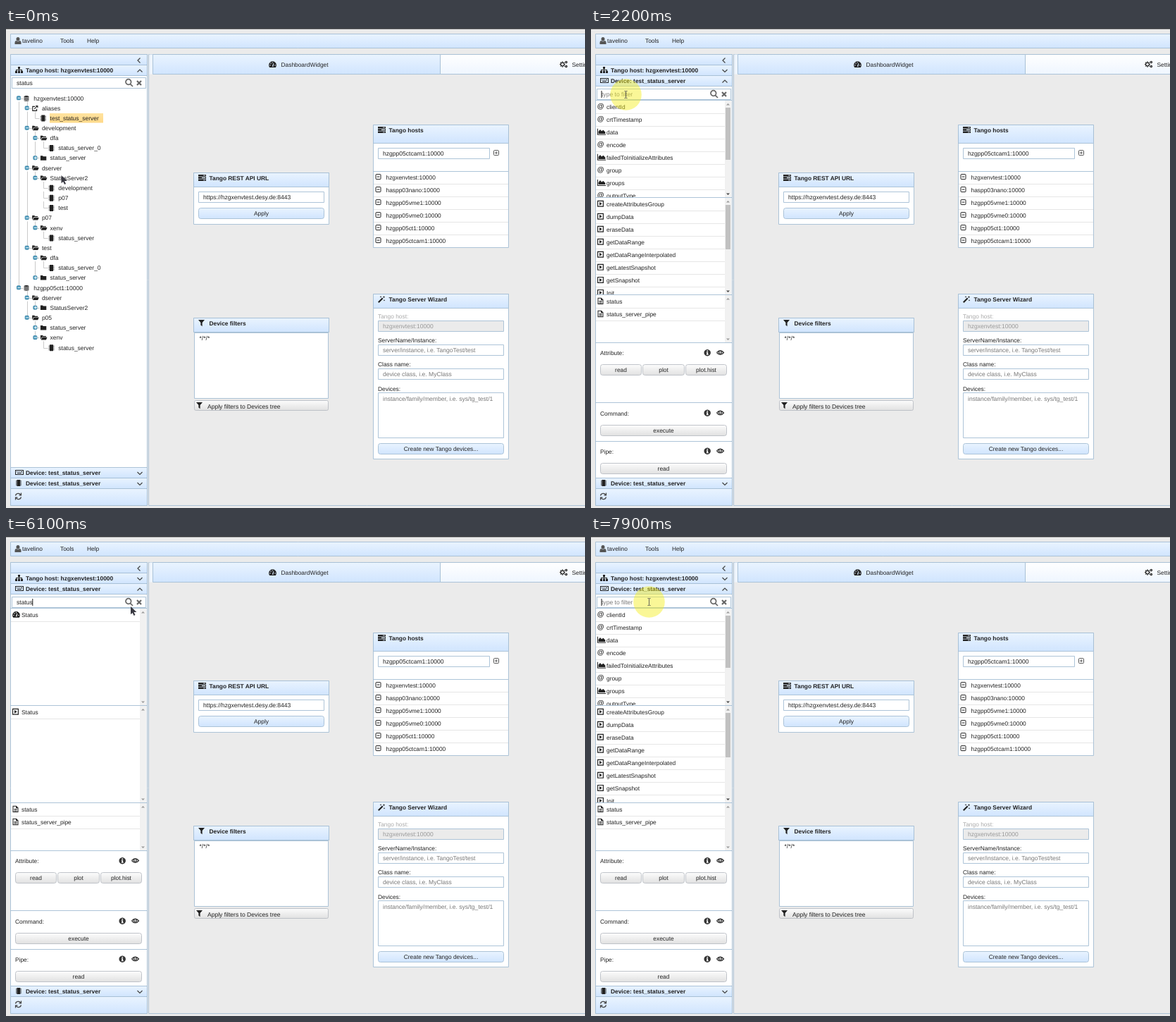
Write an HTML page with a canvas that moves like this. It is 822 by 681 pixels and loops after 8000 ms.

```html
<!DOCTYPE html>
<html lang="en">
<head>
<meta charset="utf-8">
<style>
html, body { margin: 0; width: 100%; height: 100%; overflow: hidden; background: #ebebeb; }
canvas { display: block; }
</style>
</head>
<body>
<canvas id="stage" width="822" height="681"></canvas>
<script>
const ctx = document.getElementById('stage').getContext('2d');
ctx.textRendering = 'geometricPrecision';
const LOOP = 8000, STEP = 100;
const EDGE = '#a4bed4', INK = '#222', HINT = '#777', BLUE = ['#eaf4ff', '#d1e5fe'], GREY = ['#fdfdfd', '#e2e2e2'];
const SMALL = 8.38, FIELD = 8.55;

// Paths starting with "~" are stroked, the others filled.
const shapes = {
  user: 'M4.5 0a2.4 2.6 0 0 1 0 5.4a2.4 2.6 0 0 1 0-5.4M0 10V7.5Q0 5.3 2 5Q4.5 7 7 5Q9 5.3 9 7.5V10z',
  sitemap: 'M4 0h3v3H6v1h4v2h1v3H8V6h1V5H6v1h1v3H4V6h1V5H2v1h1v3H0V6h1V4h4V3H4z',
  keyboard: 'M0 0h12v7H0zM1 1v5h10V1zM2 2h1v1H2zM4 2h1v1H4zM6 2h1v1H6zM8 2h2v1H8zM3 4h6v1H3z',
  chip: 'M1.4 0h5v9h-5zM0 1.3h1v1H0zM0 3.1h1v1H0zM0 4.9h1v1H0zM0 6.7h1v1H0zM6.8 1.3h1v1h-1zM6.8 3.1h1v1h-1zM6.8 4.9h1v1h-1zM6.8 6.7h1v1h-1z',
  search: '~M8.6 4.5a3.8 3.8 0 1 0-7.6 0a3.8 3.8 0 1 0 7.6 0M7.4 7.4l3.6 3.6',
  times: '~M1 1l6 6M7 1L1 7',
  db: 'M0 1.2Q3.5-.8 7 1.2V2Q3.5 3.4 0 2zM0 2.8Q3.5 4.2 7 2.8V4Q3.5 5.4 0 4zM0 4.8Q3.5 6.2 7 4.8V6Q3.5 7.4 0 6zM0 6.8Q3.5 8.2 7 6.8V7.6Q3.5 9 0 7.6z',
  link: '~M4 1.5H.6V7.5H6.4V5M3 5L7.5.6M5 .6h2.7v2.7',
  open: 'M0 6V.5h3l1 1h4v1.2H2.2L.5 6zM2.6 3.3H9.6L8 7H.8z',
  folder: 'M0 .5h3l1 1h4.4v5.5H0z',
  gauge: 'M1.2 9A5.4 5.4 0 1 1 9.8 9zM4.8 7.4L6.6 3l.7.3-1 4.6zM1.2 5.2h1.3v1.2H1.2zM2.4 2.6h1.2v1.2H2.4zM4.9 1.4h1.2v1.2H4.9zM8.4 5.2h1.3v1.2H8.4z',
  server: 'M0 0h11v2.5H0zM7 .8v.8h3V.8zM0 3.3h11v2.5H0zM5 4.1v.8h5v-.8zM0 6.6h11v2.5H0zM7 7.4v.8h3v-.8z',
  filter: 'M0 0h9L5.6 4v5.2L3.4 7.5V4z',
  wand: 'M0 8.5L6 2.5 7.5 4 1.5 10zM8.5 0l.5 1.3 1.3.5L9 2.3l-.5 1.3L8 2.3l-1.3-.5L8 1.3zM4 0l.4 1 1 .4-1 .4-.4 1-.4-1-1-.4 1-.4zM9 5l.4.9.9.4-.9.4L9 7.6l-.4-.9-.9-.4.9-.4z',
  info: 'M4.7 0a4.7 4.7 0 1 1-.01 0zM3.9 1.5h1.7v1.4H3.9zM3.3 3.8h2.3v3h.7v1H3.3v-1h.6V4.8h-.6z',
  eye: '~M.5 4Q5.5-2 10.5 4Q5.5 10 .5 4M7.6 3.6a2.1 2.1 0 1 0-4.2 0a2.1 2.1 0 1 0 4.2 0M5.5 3v1',
  area: 'M0 0h1v8h11v1H0zM1.6 7.2V4L4 1.2l2 2.4L8.5 2 11.3 5v2.2z',
  play: 'M0 0h9v9H0zM1.2 1.2v6.6h6.6V1.2zM3 2l3.6 2.5L3 7z',
  file: 'M0 0h5.2L8 2.8V9.4H0zM1 1v7.4h6V3.5H4.5V1zM2 4.2h4v.8H2zM2 5.7h4v.8H2zM2 7.1h4v.7H2z',
  minus: '~M1.5.6h5q1 0 1 1v5q0 1-1 1h-5q-1 0-1-1v-5q0-1 1-1M2.2 4.1h3.6',
  plus: '~M1.5.6h5q1 0 1 1v5q0 1-1 1h-5q-1 0-1-1v-5q0-1 1-1M2.2 4.1h3.6M4 2.3v3.6',
  refresh: '~M1 4A4 4 0 0 1 8.4 3M9 0v3.3H6M9 6A4 4 0 0 1 1.6 7M1 10V6.7h3',
  left: '~M3.5 0L0 3.5 3.5 7',
  up: '~M0 3.5L3.5 0 7 3.5',
  down: '~M0 0l3.5 3.5L7 0',
  cogs: '~M6.4 5a2.4 2.4 0 1 0-4.8 0a2.4 2.4 0 1 0 4.8 0M4 .8v1.6M4 7.6v1.6M0 5h1.5M6.5 5h1.5M1.1 2.1l1.1 1.1M5.8 6.8l1.1 1.1M1.1 7.9l1.1-1.1M5.8 3.2l1.1-1.1M10.5 2a1.2 1.2 0 1 0-2.4 0a1.2 1.2 0 1 0 2.4 0M10.5 8a1.2 1.2 0 1 0-2.4 0a1.2 1.2 0 1 0 2.4 0',
  arrow: 'M0 0v11.2l2.6-2.3 2 4 1.9-.9-2-3.9H8.4z',
  hand: 'M0 .8Q.9-.6 1.8.8V4.2l4.6 1Q7 5.4 6.8 7L6 11.5H1.4L-2 7.2q0-1 1-.8L0 7z',
  beam: '~M-2 -5h1.5l.5.6.5-.6H2M0-4.4V4.4M-2 5h1.5l.5-.6.5.6H2'
};
const paths = {};
for (const k in shapes) paths[k] = new Path2D(shapes[k].replace('~', ''));

function icon(name, x, y, color = INK, width = 1.2) {
  ctx.save();
  ctx.translate(x, y);
  ctx.fillStyle = ctx.strokeStyle = color;
  ctx.lineWidth = width;
  if (shapes[name][0] === '~') ctx.stroke(paths[name]);
  else ctx.fill(paths[name], 'evenodd');
  ctx.restore();
}

function text(s, x, y, { color = INK, bold = false, size = SMALL, align = 'left' } = {}) {
  ctx.font = `${bold ? 'bold ' : ''}${size}px "Liberation Sans", Arial, sans-serif`;
  ctx.fillStyle = color;
  ctx.textAlign = align;
  ctx.fillText(s, x, y + 3);
}

function box(x, y, w, h, fill = '#fff', edge = EDGE, r = 0) {
  if (Array.isArray(fill)) {
    const g = ctx.createLinearGradient(0, y, 0, y + h);
    fill.forEach((c, i) => g.addColorStop(i, c));
    fill = g;
  }
  ctx.beginPath();
  ctx.roundRect(x + .5, y + .5, w, h, r);
  ctx.fillStyle = fill;
  ctx.fill();
  if (edge) {
    ctx.strokeStyle = edge;
    ctx.lineWidth = .9;
    ctx.stroke();
  }
}

function line(x1, y1, x2, y2, color = EDGE) {
  ctx.beginPath();
  ctx.moveTo(x1, y1);
  ctx.lineTo(x2, y2);
  ctx.strokeStyle = color;
  ctx.lineWidth = .9;
  ctx.stroke();
}

function button(s, x, y, w, fill = GREY, h = 15) {
  box(x, y, w, h, fill, fill === GREY ? '#b9bec4' : EDGE, 3);
  text(s, x + w / 2 + .5, y + h / 2 + .5, { align: 'center' });
}

function field(s, x, y, w, h = 15, color = INK, fill = '#fff') {
  box(x, y, w, h, fill);
  text(s, x + 7, y + 8, { color, size: FIELD });
}

function panel(title, name, x, y, h, head) {
  box(x, y, 192, h);
  box(x, y, 192, head, BLUE);
  icon(name, x + 7, y + 3);
  text(title, x + 22.5, y + 7.5, { bold: true });
}

function backdrop() {
  ctx.fillStyle = '#ebebeb';
  ctx.fillRect(0, 0, 822, 681);
  ctx.fillStyle = '#2d2f33';
  ctx.fillRect(0, 0, 822, 1.5);
  box(6, 8, 830, 20, BLUE);
  icon('user', 12.5, 13, '#555');
  text('tavelino', 23, 18);
  text('Tools', 77, 18);
  text('Help', 115, 18);

  box(202, 37, 640, 640, '#ebebeb');
  box(203, 37, 5, 28, '#eef5fd', null);
  box(208, 37, 408, 28, BLUE);
  box(616, 37, 220, 28, ['#ffffff', '#eff6ff']);
  icon('gauge', 373, 47);
  text('DashboardWidget', 390.5, 51.5);
  icon('cogs', 786, 46.5);
  text('Settings', 803.5, 52);

  panel('Tango REST API URL', 'server', 266, 205, 73, 20);
  field('https://hzgxenvtest.desy.de:8443', 273, 232, 178);
  button('Apply', 273, 255, 178, BLUE);

  panel('Device filters', 'filter', 266, 411, 20, 20);
  box(267, 432, 190, 93);
  text('*/*/*', 274.5, 440, { size: FIELD });
  box(267, 528, 190, 14, GREY, '#b9bec4', 2);
  icon('filter', 270, 531);
  text('Apply filters to Devices tree', 286, 536.5, { size: FIELD });

  panel('Tango hosts', 'server', 521, 137, 174, 26);
  field('hzgpp05ctcam1:10000', 528, 170, 158);
  icon('plus', 692, 173, '#555', 1);
  line(521, 203.5, 713, 203.5);
  ['hzgxenvtest', 'haspp03nano', 'hzgpp05vme1', 'hzgpp05vme0', 'hzgpp05ct1', 'hzgpp05ctcam1'].forEach((host, i) => {
    const y = 212 + 18 * i;
    icon('minus', 524.5, y - 5, INK, 1);
    text(host + ':10000', 539.5, y);
    if (i < 5) line(522, y + 9.5, 713, y + 9.5, '#e2e2e2');
  });

  panel('Tango Server Wizard', 'wand', 521, 377, 234, 20);
  text('Tango host:', 528, 408.5, { color: '#aaa' });
  field('hzgxenvtest:10000', 528, 415, 178, 15, '#999', '#ebebeb');
  text('ServerName/Instance:', 528, 442.5);
  field('server/instance, i.e. TangoTest/test', 528, 449, 178, 15, HINT);
  text('Class name:', 528, 477);
  field('device class, i.e. MyClass', 528, 483, 178, 15, HINT);
  text('Devices:', 528, 511.5);
  box(528, 517, 178, 64);
  text('instance/family/member, i.e. sys/tg_test/1', 535, 526, { color: HINT, size: FIELD });
  button('Create new Tango devices...', 528, 589, 178, BLUE);
}

function header(title, name, y, chevron) {
  box(6, y, 194, 15, BLUE);
  icon(name, name === 'chip' ? 14 : 13, y + (name === 'keyboard' ? 4 : 3));
  text(title, 28, y + 7.5, { bold: true });
  icon(chevron, 186.5, y + 7, '#444');
}

function sidebar() {
  box(6, 37, 194, 640);
  box(6, 37, 194, 15, BLUE);
  icon('left', 187, 42.5, '#444');
  header('Device: test_status_server', 'chip', 638, 'down');
  box(6, 653, 194, 24, BLUE);
  icon('refresh', 12.5, 659.5, '#444');
}

function searchBar(y, typed, caret) {
  box(8, y, 190, 15);
  text(typed || 'type to filter', 15, y + 8, { color: typed ? INK : HINT, size: FIELD });
  if (caret) {
    const x = 15 + (typed ? ctx.measureText(typed).width : 0);
    line(x, y + 3, x, y + 13, '#000');
  }
  icon('search', 169, y + 2, '#666', 1.7);
  icon('times', 185, y + 4, '#666', 2.2);
}

// Level, then icon initial (d b, l ink, c hip, o pen, f older), then label.
const tree = `0d hzgxenvtest:10000|1l aliases|2c test_status_server|1o development|2o dfa|3c status_server_0
2f status_server|1o dserver|2o StatusServer2|3c development|3c p07|3c test|1o p07|2o xenv|3c status_server|1o test
2o dfa|3c status_server_0|2f status_server|0d hzgpp05ct1:10000|1o dserver|2f StatusServer2|1o p05|2f status_server
2o xenv|3c status_server`.split(/[|\n]/).map(s => ({ level: +s[0], kind: s[1], label: s.slice(3) }));
const kinds = { d: 'db', l: 'link', c: 'chip', o: 'open', f: 'folder' };
const rowY = i => 99.5 + 14.16 * i;
const boxX = level => 18 + 11.7 * level;

function drawTree(focus) {
  const last = [];
  tree.forEach(({ level }, i) => {
    const y = Math.round(rowY(i)) + .5, x = Math.round(boxX(level)) + .5;
    const from = last[level] > (last[level - 1] ?? -1) ? last[level] : last[level - 1];
    if (from !== undefined) line(x, rowY(from) + 5, x, y, '#c4c4c4');
    line(x, y, x + 6, y, '#c4c4c4');
    last[level] = i;
  });
  box(61.5, 120.5, 76, 13.5, ['#ffe3a0', '#ffd98a'], null);
  tree.forEach(({ level, kind, label }, i) => {
    const y = rowY(i), x = boxX(level);
    if (kind !== 'c') {
      box(x - 3, y - 3.2, 5, 5, '#4d9bbd', '#3b87aa', 1);
      line(x - 1.5, y - .2, x + 2.5, y - .2, '#fff');
      if (kind === 'f') line(x + .5, y - 2.2, x + .5, y + 1.8, '#fff');
    }
    icon(kinds[kind], x + 7.5, y - (kind === 'c' ? 4.3 : 3.8), INK, 1.1);
    text(label, x + 21.2, y, { size: 8.48 });
  });
  if (focus) {
    ctx.setLineDash([1, 1]);
    box(11, 121, 182, 14, 'transparent', '#444');
    ctx.setLineDash([]);
  }
}

const attributes = [['at', 'clientId'], ['at', 'crtTimestamp'], ['area', 'data'], ['at', 'encode'],
  ['area', 'failedToInitializeAttributes'], ['at', 'group'], ['area', 'groups'], ['at', 'outputType'],
  ['gauge', 'State'], ['gauge', 'Status']];
const commands = ['createAttributesGroup', 'dumpData', 'eraseData', 'getDataRange', 'getDataRangeInterpolated',
  'getLatestSnapshot', 'getSnapshot', 'Init', 'startCollectData', 'startLightPolling',
  'startLightPollingAtFixedRate', 'State', 'Status', 'stopCollectData'].map(s => ['play', s]);
const pipes = [['file', 'status'], ['file', 'status_server_pipe']];

function triangle(y, dir, color) {
  ctx.beginPath();
  ctx.moveTo(192, y + dir);
  ctx.lineTo(197, y + dir);
  ctx.lineTo(194.5, y - 1.5 * dir);
  ctx.fillStyle = color;
  ctx.fill();
}

function list(items, filter, top, bottom, thumb) {
  const rows = items.filter(r => r[1].toLowerCase().includes(filter));
  const full = rows.length > 7;
  ctx.save();
  ctx.beginPath();
  ctx.rect(7, top, 193, bottom - top);
  ctx.clip();
  rows.forEach(([name, label], i) => {
    const y = top + 8.7 + 18.03 * i;
    if (name === 'at') text('@', 8.7, y - .5, { size: 10, bold: true });
    else icon(name, name === 'file' ? 9.5 : 9, y - 5);
    text(label, 22, y);
    line(7, Math.round(y + 9) + .5, 190, Math.round(y + 9) + .5, '#e4e4e4');
  });
  ctx.fillStyle = '#f1f1f1';
  ctx.fillRect(190, top, 9.5, bottom - top);
  if (full) {
    ctx.fillStyle = '#c1c1c1';
    ctx.fillRect(191, top + 10, 7, thumb);
  }
  triangle(top + 5.5, 1, '#999');
  triangle(bottom - 4.5, -1, full ? '#444' : '#999');
  ctx.restore();
  line(6, bottom + .5, 200, bottom + .5);
}

function deviceForm(label, y) {
  text(label, 13, y);
  icon('info', 160.5, y - 5, '#333');
  icon('eye', 178, y - 4.5, '#333');
}

function devicePanel(typed, filter, caret) {
  header('Tango host: hzgxenvtest:10000', 'sitemap', 52, 'down');
  header('Device: test_status_server', 'keyboard', 67, 'up');
  searchBar(86, typed, caret);
  line(6, 102.5, 200, 102.5);
  list(attributes, filter, 103, 240, 74);
  list(commands, filter, 241, 378, 63);
  list(pipes, '', 379, 446, 0);
  deviceForm('Attribute:', 461);
  button('read', 13, 477, 58);
  button('plot', 73, 477, 59);
  button('plot.hist', 134, 477, 58);
  line(6, 531.5, 200, 531.5);
  deviceForm('Command:', 546.5);
  button('execute', 13, 563, 179);
  line(6, 586.5, 200, 586.5);
  deviceForm('Pipe:', 600.5);
  button('read', 13, 617, 179);
}

// Pointer track: time, x, y.
const track = [[200, 78.5, 209], [300, 84, 195], [400, 91, 168], [500, 84, 140], [600, 78.5, 126], [1400, 78.5, 126],
  [1700, 55.5, 102.5], [2000, 49.5, 94.5], [5500, 49.5, 94.5], [5600, 53.5, 98], [5700, 53.5, 98], [5800, 75, 106],
  [5900, 112, 112], [6000, 150, 110], [6100, 177, 100], [6200, 187.5, 92.5], [6900, 187.5, 92.5], [7500, 82.5, 93.5]];

function pointer(t) {
  const n = track.findIndex(k => k[0] >= t);
  const b = n < 0 ? track[track.length - 1] : track[n], a = track[n - 1] || b;
  const p = a === b ? 1 : (t - a[0]) / (b[0] - a[0]);
  const x = a[1] + (b[1] - a[1]) * p, y = a[2] + (b[2] - a[2]) * p;
  const overField = t > 1700 && y < 101.5 && y > 86;
  if (overField && x < 166) icon('beam', x, y, '#555', .9);
  else if (overField && x > 180) icon('hand', x, y, '#333');
  else icon('arrow', x, y, '#3a3a42');
}

// Click rings: shown, fade start, gone, x, y. Each one swells in over three steps.
const clicks = [[1000, 1500, 1800, 78.5, 126.5], [2000, 2900, 3100, 49.5, 94.5],
  [6700, 7300, 7600, 187, 94], [7600, 8000, 8300, 82.5, 93.5]];

function rings(t) {
  for (const [on, fade, off, x, y] of clicks) {
    if (t < on || t >= off) continue;
    const rise = (t - on + STEP) / (3 * STEP), fall = (off - t) / (off - fade + STEP);
    ctx.fillStyle = `rgba(245,238,30,${.46 * Math.min(1, rise, fall)})`;
    ctx.beginPath();
    ctx.arc(x, y, 22.3, 0, 7);
    ctx.fill();
  }
}

const at = (t, steps) => steps.reduce((v, [time, value]) => t >= time ? value : v, '');
const typing = [[3300, 's'], [3400, 'st'], [4100, 'sta'], [4400, 'stat'], [4600, 'statu'], [4900, 'status'], [6700, '']];
const filters = [[3700, 'st'], [4400, 'sta'], [4900, 'status'], [6700, '']];
const carets = [[2200, true], [5600, false], [5800, true], [6700, false], [7500, true]];

function draw(t) {
  backdrop();
  sidebar();
  if (t < 1200) {
    header('Tango host: hzgxenvtest:10000', 'sitemap', 52, 'up');
    searchBar(70, 'status');
    drawTree(t >= 1100);
    header('Device: test_status_server', 'keyboard', 623, 'down');
  } else {
    devicePanel(at(t, typing), at(t, filters), at(t, carets));
  }
  rings(t);
  pointer(t);
}

let shown = -1;
const start = performance.now();
function tick() {
  const t = Math.floor((performance.now() - start) % LOOP / STEP) * STEP;
  if (t !== shown) draw(shown = t);
  requestAnimationFrame(tick);
}
tick();
</script>
</body>
</html>
```
